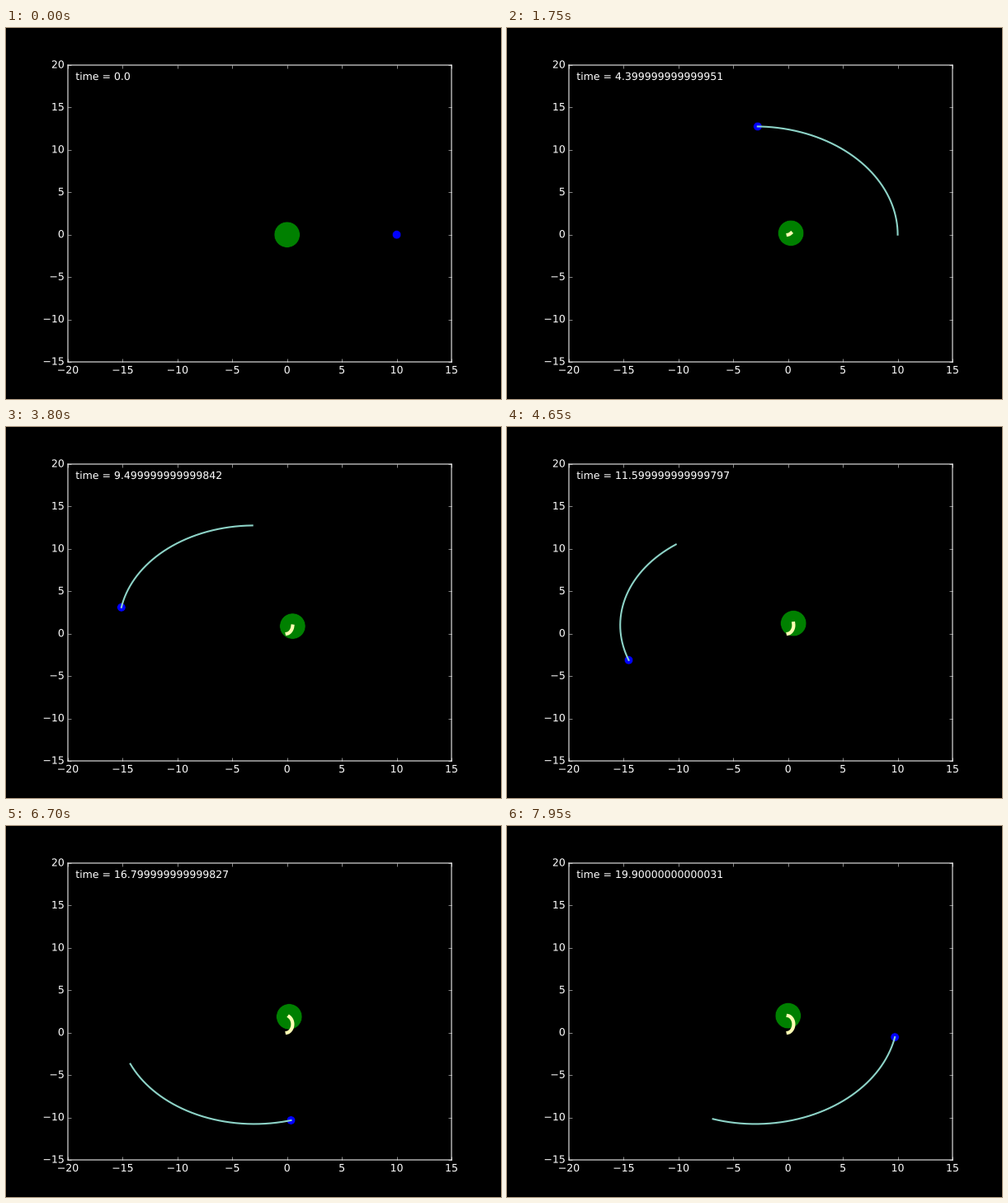
A matplotlib script that plays this animation: 600x450 px, repeating every 8 s.

```python
import math

import numpy as np
import matplotlib.pyplot as plt
from matplotlib import patheffects
from matplotlib.animation import FuncAnimation

FRAMES = 160
INTERVAL = 50          # ms
DT = 0.01              # integration step
SUBSTEPS = 10          # steps between two drawn states
TRAIL = 500            # steps kept in the planet's trail

SUN_MASS = 200.0
PLANET_MASS = 4.0


def accelerations(sun, planet):
    d = planet - sun
    pull = d / np.hypot(*d) ** 3
    return PLANET_MASS * pull, -SUN_MASS * pull


def simulate(steps):
    """Integrate both bodies with velocity Verlet."""
    sun, planet = np.array([0.0, 0.0]), np.array([10.0, 0.0])
    v_sun, v_planet = np.array([0.0, 0.0]), np.array([0.0, 5.0])
    a_sun, a_planet = accelerations(sun, planet)
    t = 0.0
    times, suns, planets = [t], [sun], [planet]
    for _ in range(steps):
        v_sun = v_sun + a_sun * DT / 2
        v_planet = v_planet + a_planet * DT / 2
        sun = sun + v_sun * DT
        planet = planet + v_planet * DT
        a_sun, a_planet = accelerations(sun, planet)
        v_sun = v_sun + a_sun * DT / 2
        v_planet = v_planet + a_planet * DT / 2
        t += DT
        times.append(t)
        suns.append(sun)
        planets.append(planet)
    return times, np.array(suns), np.array(planets)


def step_at(frame):
    """Simulation step shown in a frame (1.25 states per frame)."""
    return SUBSTEPS * math.floor(1.25 * frame + 0.5)


times, suns, planets = simulate(step_at(FRAMES - 1))

plt.style.use(["classic", "dark_background"])
plt.rcParams.update({
    "font.family": "DejaVu Sans",
    "savefig.dpi": "figure",
    "text.hinting": "none",
    # Draw lines, markers and text as paths at sub-pixel positions.
    "path.snap": False,
    "path.effects": [patheffects.Normal()],
})

fig = plt.figure(figsize=(8, 6), dpi=75, facecolor="black")
ax = fig.add_axes([0.125, 0.1, 0.775, 0.8], facecolor="black")
ax.set_xlim(-20, 15)
ax.set_ylim(-15, 20)

planet_dot, = ax.plot([], [], "o", color="#0000ff", ms=10, mec="black", mew=0.5)
sun_dot, = ax.plot([], [], "o", color="#008000", ms=30, mec="black", mew=0.5)
planet_trail, = ax.plot([], [], color="#8dd3c7", lw=2)
sun_trail, = ax.plot([], [], color="#feffb3", lw=4)
label = ax.text(0.02, 0.95, "", transform=ax.transAxes)


def update(frame):
    n = step_at(frame)
    first = max(0, n - TRAIL)
    planet_dot.set_data(planets[n:n + 1].T)
    sun_dot.set_data(suns[n:n + 1].T)
    planet_trail.set_data(planets[first:n + 1].T)
    sun_trail.set_data(suns[:n + 1].T)
    label.set_text(f"time = {times[n]}")
    return planet_dot, sun_dot, planet_trail, sun_trail, label


anim = FuncAnimation(fig, update, frames=FRAMES, interval=INTERVAL,
                     init_func=lambda: update(0), repeat=True,
                     repeat_delay=0, blit=False)
plt.show()
```
